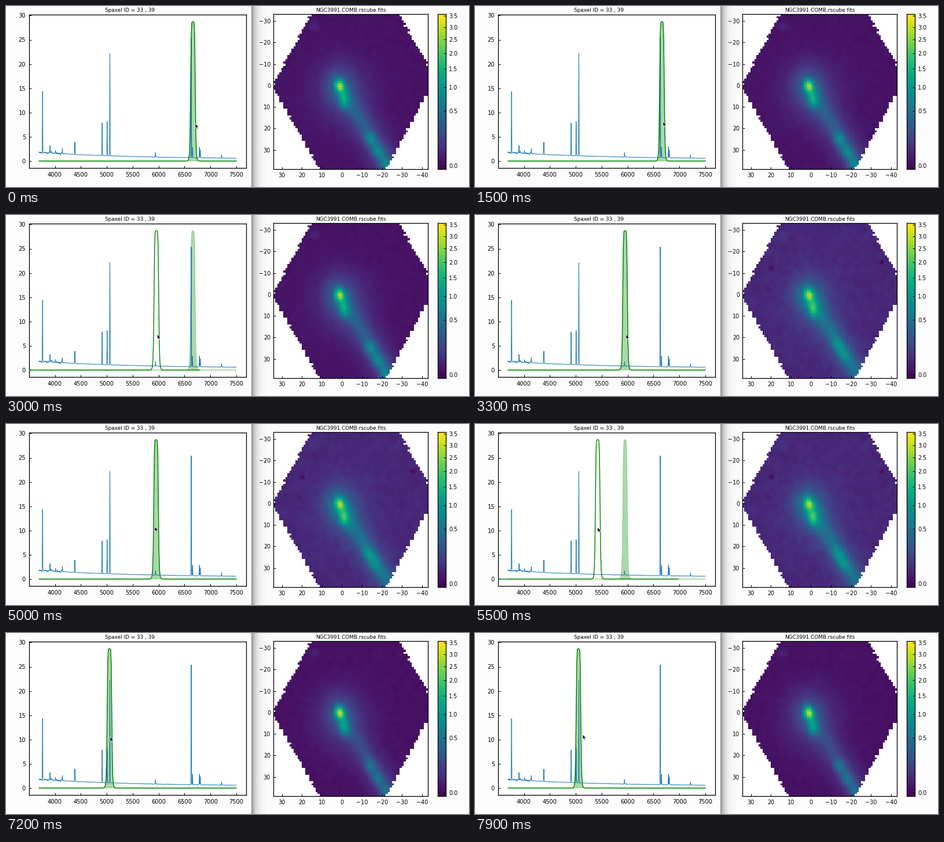
Animation, 800 px wide and 314 px high, one loop 8 s. Source, as a matplotlib script:

```python
import numpy as np
import matplotlib.pyplot as plt
from matplotlib.animation import FuncAnimation
from matplotlib.colors import ListedColormap

W, H, DPI = 800, 314, 100
FRAMES, STEP = 80, 100
PT = 72 / DPI

plt.rcParams.update({
    "font.family": "DejaVu Sans",
    "axes.linewidth": 1.3 * PT,
    "xtick.direction": "in", "ytick.direction": "in",
    "xtick.major.size": 4 * PT, "ytick.major.size": 4 * PT,
    "xtick.major.width": PT, "ytick.major.width": PT,
})

fig = plt.figure(figsize=(W / DPI, H / DPI), dpi=DPI, facecolor="#fcfcfc")
rng = np.random.default_rng(4)


def panel(left, top, right, bottom, **kw):
    box = [left / W, 1 - bottom / H, (right - left) / W, (bottom - top) / H]
    return fig.add_axes(box, **kw)


def stage(z):
    ax = panel(0, 0, W, H, zorder=z)
    ax.set(xlim=(0, W), ylim=(H, 0))
    ax.axis("off")
    return ax


def label_style(ax, px, xpad, ypad):
    ax.tick_params(labelsize=px * PT)
    ax.tick_params(axis="x", pad=xpad * PT)
    ax.tick_params(axis="y", pad=ypad * PT)


# Window shadow and titles
back = stage(-1)
shade = 0.988 - 0.45 * np.exp(-(np.arange(26) + 0.5) / 7)
back.imshow(shade[None, :], cmap="gray", vmin=0, vmax=1, aspect="auto",
            extent=(424, 450, H, 0), interpolation="nearest")
back.set(xlim=(0, W), ylim=(H, 0))
back.text(171, 10.3, "Spaxel ID = 33 , 39", size=8.9 * PT)
back.text(535, 9.5, "NGC3991.COMB.rscube.fits", size=8.9 * PT)


# Spectrum panel
def wave(px):
    return 4000 + (np.asarray(px) - 84.5) * 3500 / 313.5


spec = panel(40, 14.6, 415, 281)
spec.set(xlim=wave([40, 415]), ylim=((269 - 281) / 8.42, (269 - 14.6) / 8.42))
spec.set_xticks(range(4000, 7501, 500))
spec.set_yticks(range(0, 31, 5))
label_style(spec, 9.9, 7.5, 6)

lam = np.arange(3690, 7500, 2.0)
noise = np.convolve(rng.normal(0, 1, lam.size), np.ones(8) / 8, "same")
flux = 0.4 + 1.4 * np.exp(-(lam - 3690) / 1900)
flux += noise * np.where(lam < 4150, 0.25, 0.05)


def line(mid, amp):
    return amp * np.exp(-0.5 * ((lam - mid) / 3.2) ** 2)


# Redshifted Balmer series, then the other strong lines
for n in range(3, 10):
    flux += line(1.0105 * 3645.1 * n * n / (n * n - 4), 24.7 * (3 / n) ** 4.4)
for mid, amp in [(3762, 12.6), (3906, 1.5), (5008, 7), (5060, 21.1), (5940, 0.9),
                 (6654, 2.1), (6788, 2.2), (6804, 1.6), (7214, 0.65)]:
    flux += line(mid, amp)
spec.plot(lam, flux, color="C0", lw=PT, zorder=2)

LEFT, RIGHT = 57, 398


def band(mid, shift=0):
    d = np.linspace(-14, 14, 29)
    y = 28.7 / (1 + np.abs(d / 4.1) ** 7)
    x = np.concatenate([[LEFT + shift], mid + d, [RIGHT + shift]])
    return wave(x), np.concatenate([[0], y, [0]])


fill, = spec.fill(*band(323), color="tab:green", alpha=0.4, lw=0.9 * PT, zorder=1)
edge, = spec.plot(*band(323), color="green", lw=1.4 * PT, zorder=3)

# Viridis with the screen's deeper greens
rgb = plt.get_cmap("viridis")(np.linspace(0, 1, 256))[:, :3]
rgb[:, 0] -= 0.2 * np.clip(rgb[:, 1] - rgb[:, 0], 0, None)
cmap = ListedColormap(np.clip(rgb, 0, 1))

# Map panel
X0, X1, Y0, Y1 = 462, 729, 14, 283
NX, NY = 77, 72
sky = panel(X0, Y0, X1, Y1)
px, py = np.meshgrid(X0 + (np.arange(NX) + 0.5) * (X1 - X0) / NX,
                     Y0 + (np.arange(NY) + 0.5) * (Y1 - Y0) / NY)
rise = np.abs(py - 132 + 0.05 * (px - 601))
teeth = 2 * np.sin(np.arange(NY) * 2.1)[:, None]
outside = np.abs(px - 601) > 138 - 0.55 * np.maximum(rise - 5, 0) + teeth


def blob(x, y, amp, sx, sy, tilt=0):
    a = np.radians(tilt)
    dx, dy = px - x, py - y
    u = dx * np.cos(a) + dy * np.sin(a)
    v = dy * np.cos(a) - dx * np.sin(a)
    return amp * np.exp(-0.5 * ((u / sx) ** 2 + (v / sy) ** 2))


def ridge(amp, width):
    ux, uy = np.array([85, 138]) / np.hypot(85, 138)
    along = (px - 580) * ux + (py - 145) * uy
    across = (px - 580) * uy - (py - 145) * ux
    return amp * np.exp(-0.5 * (across ** 2 + np.minimum(along, 0) ** 2) / width ** 2)


def grain(amp):
    g = rng.normal(0, 1, (NY, NX))
    for _ in range(2):
        g = (g + np.roll(g, 1, 0) + np.roll(g, 1, 1) + np.roll(g, (1, 1), (0, 1))) / 4
    return amp * g / g.std()


def galaxy(base, rough, core, knot, halo, tail, clump, spots):
    """Light along the tail; clumps sit at the given steps down it."""
    v = base ** 2 + blob(577, 138.5, core, 5, 7, -12)
    v += blob(584, 162, knot, 5.5, 9.5, -10)
    v += blob(577, 141, halo, 15, 20, -15) + blob(582, 150, halo / 4, 32, 37)
    v += ridge(tail, 8) + ridge(tail / 2, 17)
    for k in spots:
        v += blob(630 + 13 * k, 231 + 22 * k, clump, 6, 8, -27)
    t = np.sqrt(v) + grain(rough) + blob(532, 35, 0.05, 6, 6)
    return t


knots = (0, 1, 2)
maps = [
    galaxy(0.05, 0.004, 0.62, 0.29, 0.07, 0.055, 0.15, knots),
    galaxy(0.11, 0.008, 0.56, 0.35, 0.1, 0.085, 0.1, (-0.4, 0.15, 0.7)),
    galaxy(0.045, 0.004, 0.7, 0.25, 0.06, 0.033, 0.1, knots),
]
maps[1] -= blob(512, 92, 0.1, 3, 3) + blob(703, 82, 0.1, 3, 3)
maps = [np.ma.masked_where(outside, np.clip(m, 0, 1)) for m in maps]

picture = sky.imshow(maps[0], cmap=cmap, vmin=0, vmax=1, aspect="auto",
                     extent=(34.2, -42.9, 38.9, -33.2), interpolation="nearest")
sky.set_xticks(range(30, -41, -10))
sky.set_yticks(range(-30, 31, 10))
label_style(sky, 9.6, 6, 5)

# Colour bar, square-root scale
bar = panel(746, Y0, 760, Y1)
bar.imshow(np.linspace(0, 1, 256)[:, None], cmap=cmap, aspect="auto",
           origin="lower", extent=(0, 1, 0, 1))
levels = np.arange(0, 3.6, 0.5)
bar.set_xticks([])
bar.set_yticks(np.sqrt((levels + 0.002) / 3.582), [f"{v:.1f}" for v in levels])
bar.yaxis.tick_right()
label_style(bar, 9.6, 5, 5)

# Mouse pointer
front = stage(5)
ARROW = np.array([(0, 0), (0, 8.4), (1.9, 6.7), (3.2, 9.7), (4.6, 9.1),
                  (3.3, 6.2), (5.9, 6.0)])
pointer, = front.fill(*ARROW.T, fc="black", ec="white", lw=0.7 * PT)

# Motion: two drags, each followed by a pause before the release
DRAGS = [(1500, 3150), (5000, 6400)]
RELEASES = (3300, 6900)
CENTRES = (323, 259.3, 178.8)
STROLLS = [(500, 1100), DRAGS[0], (4000, 4600), DRAGS[1], (7800, 7900)]
STOPS = np.array([(327, 204), (325, 200.5), (261, 207), (257, 178),
                  (180, 180), (186, 176)])


def glide(t, stops, spans):
    """Ease out from stop to stop, one span of time per leg."""
    pos = stops[0]
    for (start, end), a, b in zip(spans, stops, stops[1:]):
        u = np.clip((t - start) / (end - start), 0, 1)
        pos = pos + (b - a) * (1 - (1 - u) ** 2)
    return pos


def draw(i):
    t = i * STEP
    state = sum(t >= r for r in RELEASES)
    home = CENTRES[state]
    mid = glide(t, CENTRES, DRAGS)
    fill.set_xy(np.column_stack(band(home)))
    edge.set_data(*band(mid, mid - home))
    picture.set_data(maps[state])
    pointer.set_xy(ARROW + glide(t, STOPS, STROLLS))
    return fill, edge, picture, pointer


anim = FuncAnimation(fig, draw, frames=FRAMES, interval=STEP,
                     init_func=lambda: draw(0), repeat=True, repeat_delay=0)
plt.show()
```
